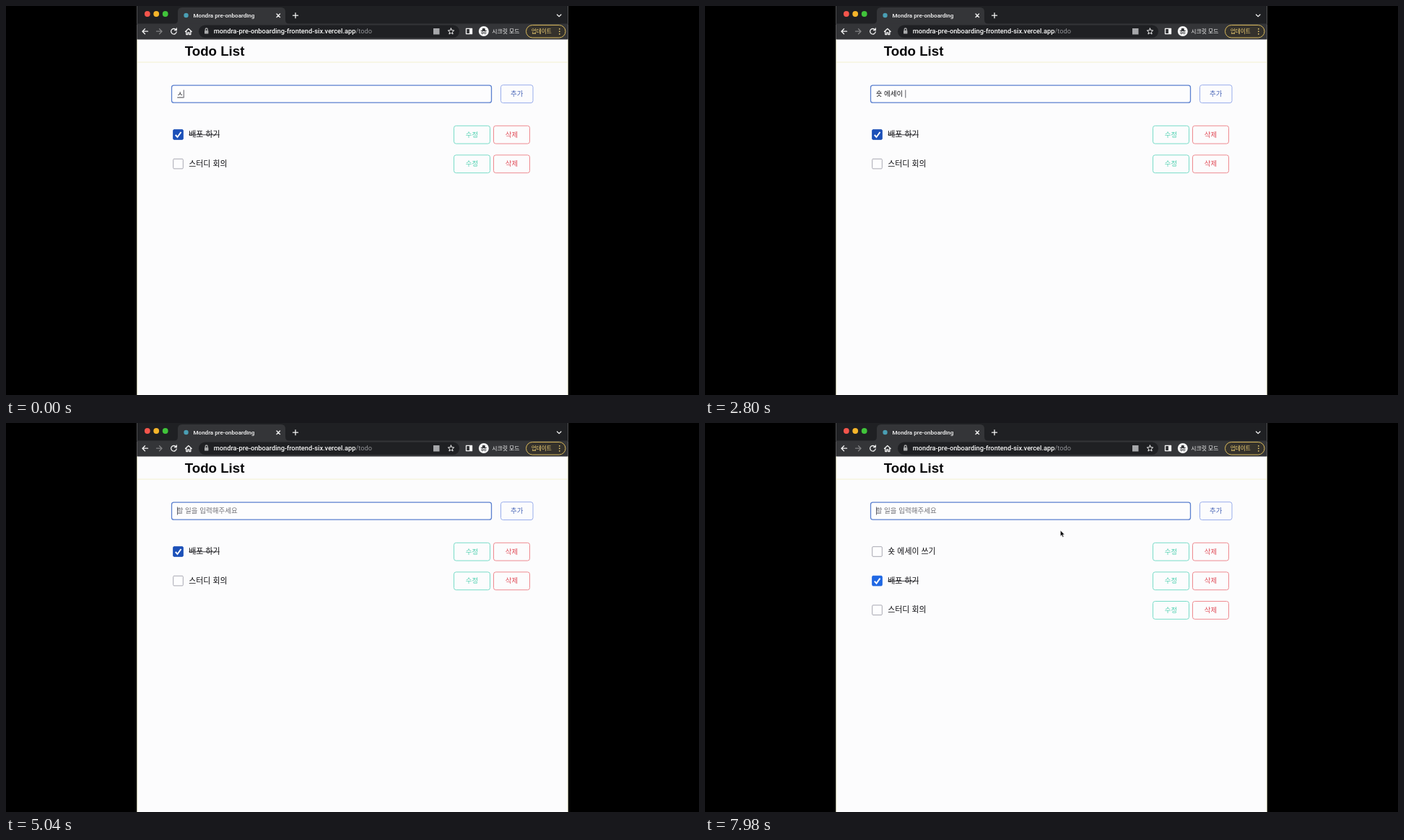
Animation of 960 by 540 pixels, one loop 8000 ms. Source, as an HTML page:

```html
<!DOCTYPE html>
<html lang="ko">
<head>
<meta charset="utf-8">
<title>Todo List</title>
<style>
  html, body { margin: 0; width: 100%; height: 100%; overflow: hidden; background: #000; }
  svg { display: block; width: 100%; height: 100%; }
  text { font-family: "Noto Sans CJK KR", "Noto Sans CJK", "Noto Sans CJK JP", sans-serif; white-space: pre; }
  .latin { font-family: Roboto, Inter, sans-serif; font-weight: 500; fill: #f8f8f8; }
  .title { font: bold 18.7px "Liberation Sans", Arial, sans-serif; fill: #060608; }
  .icon { fill: none; stroke: #f4f4f4; stroke-width: 1.3; stroke-linecap: round; stroke-linejoin: round; }
  .field { font-size: 9.5px; }
  .button { font-size: 9.4px; font-weight: 500; text-anchor: middle; }
  .label { font-size: 10.9px; fill: #101014; }
</style>
</head>
<body>
<svg viewBox="0 0 960 540">
  <rect width="960" height="540"/>
  <rect x="181.5" width="597" height="540" fill="#fcfcfd"/>

  <!-- Browser window -->
  <rect x="181.5" width="597" height="26" fill="#1f2023"/>
  <path d="M232 25Q238 25 238 19V8Q238 2 244 2H381Q387 2 387 8V19Q387 25 393 25Z" fill="#343538"/>
  <rect x="181.5" y="24.500" width="597" height="22" fill="#343538"/>
  <circle cx="195.800" cy="11" r="3.900" fill="#f4554c"/>
  <circle cx="208.200" cy="11" r="3.900" fill="#f5b52a"/>
  <circle cx="220.700" cy="11" r="3.900" fill="#40c43a"/>
  <circle cx="249.500" cy="13" r="3.200" fill="#4a9fb4"/>
  <text class="latin" x="259.500" y="16" font-size="8.050">Mondra pre-onboarding</text>
  <path class="icon" d="M375 11l4.500 4.500m0-4.500l-4.500 4.500M397.500 13.200h7m-3.500-3.500v7M763.500 12l2.700 2.600 2.700-2.600"/>

  <rect x="267" y="26.500" width="361" height="17.500" rx="8.750" fill="#1f2023"/>
  <path class="icon" d="M196.500 35.200h-7.500m3.500-3.500l-3.500 3.500 3.500 3.500"/>
  <path class="icon" opacity=".4" d="M208.500 35.200h7.500m-3.500-3.500l3.500 3.500-3.500 3.500"/>
  <path class="icon" d="M235.500 33a3.800 3.800 0 1 0 .7 3M236.300 31v2.700h-2.700M248.500 35.500l4.300-4 4.300 4m-7.300-1v5h2v-2.600h2v2.600h2v-5"/>
  <g opacity=".65">
    <rect x="275" y="34" width="5.400" height="4.600" rx=".7" fill="#f4f4f4"/>
    <path class="icon" stroke-width="1" d="M276.200 34v-1.500a1.500 1.500 0 0 1 3 0V34"/>
  </g>
  <text class="latin" x="287.700" y="38.200" font-size="9.250">mondra-pre-onboarding-frontend-six.vercel.app<tspan fill="#929397" font-weight="400">/todo</tspan></text>
  <rect x="592" y="31" width="8.500" height="8.500" fill="#a6a7aa"/>
  <path class="icon" style="stroke-width:1" d="M616.500 31l1.200 2.800 3 .2-2.300 2 .7 3-2.600-1.600-2.600 1.600.7-3-2.300-2 3-.2z"/>
  <path class="icon" d="M637.500 31.300h8v7.400h-8z"/>
  <path d="M642 31h4v8h-4z" fill="#f4f4f4"/>
  <circle cx="661.800" cy="35" r="7" fill="#f8f8f8"/>
  <path d="M659.500 34l.6-3h3.400l.6 3z" fill="#343538"/>
  <path d="M657.800 34.500h8" stroke="#343538"/>
  <g fill="none" stroke="#343538" stroke-width=".9">
    <circle cx="660" cy="37.300" r="1.300"/><circle cx="663.600" cy="37.300" r="1.300"/>
  </g>
  <text x="673.300" y="38" font-size="7.800" font-weight="500" fill="#f8f8f8">시크릿 모드</text>
  <rect x="720.500" y="26.500" width="54.500" height="17.500" rx="8.750" fill="#35322c" stroke="#d9b95c"/>
  <text x="727.700" y="38" font-size="7.600" font-weight="500" fill="#f4d476">업데이트</text>
  <path class="icon" style="stroke:#f4d476;stroke-width:1.7" d="M766.800 31.800v0m0 3.500v0m0 3.500v0"/>

  <!-- Page -->
  <path d="M182 46.500V540M778 46.500V540" stroke="#f5f4d8"/>
  <path d="M182 78h596" stroke="#f3f1d0"/>
  <text class="title" x="247.700" y="69">Todo List</text>
  <rect x="229.500" y="110.200" width="443" height="24" rx="3" fill="#fdfdfe" stroke="#5b80cf" stroke-width="1.300"/>
  <text id="entry" class="field" x="236.700" y="125"></text>
  <path id="underline" stroke="#2c2c30" stroke-width=".9"/>
  <path id="caret" stroke="#505058" stroke-width=".9"/>
  <rect x="685.500" y="109.700" width="44.500" height="24.800" rx="3" fill="none" stroke="#98acec"/>
  <text class="button" x="707.700" y="125" fill="#4a66b8">추가</text>
  <g id="list"></g>
  <path id="pointer" d="M0 0v8.200l1.900-1.700 1.300 2.900 1.500-.7-1.300-2.800h2.500z" fill="#08080a" stroke="#fcfcfd" stroke-width=".6"/>
</svg>
<script>
const LOOP = 8000, SUBMIT = 5040, ADDED = 5100;
const FIELD_X = 236.7, ROW_Y = 178.5, ROW_STEP = 40.6;
const PLACEHOLDER = "할 일을 입력해주세요";
const MOVE = { start: 7840, end: 7980, from: [696, 176], to: [492.3, 149] };

// Input contents as Hangul syllables are composed
const typing = [
  [0, "ㅅ"], [200, "쇼"], [420, "숏"], [1400, "숏 "], [1560, "숏 ㅇ"], [1720, "숏 에"],
  [2100, "숏 엣"], [2240, "숏 에세"], [2400, "숏 에셍"], [2520, "숏 에세이"], [2700, "숏 에세이 "],
  [3760, "숏 에세이 ㅆ"], [3920, "숏 에세이 쓰"], [4040, "숏 에세이 쓱"], [4160, "숏 에세이 쓰기"],
  [SUBMIT, ""]
];
const blinking = [
  [0, true], [1120, false], [1400, true], [2920, false], [3760, true], [4620, false],
  [SUBMIT, true], [5500, false], [6200, true], [7000, false], [7840, true]
];
const todos = [
  { text: "배포 하기", done: true },
  { text: "스터디 회의" }
];
const added = { text: "숏 에세이 쓰기" };

const [entry, underline, caret, list, pointer] =
  ["entry", "underline", "caret", "list", "pointer"].map(id => document.getElementById(id));

const valueAt = (steps, t) => steps.findLast(([start]) => start <= t)[1];

const button = (x, label, border, color) => `
  <rect x="${x}" y="-12.2" width="50" height="24.8" rx="3" fill="none" stroke="${border}"/>
  <text class="button" x="${x + 25}" y="3" fill="${color}">${label}</text>`;

function row({ text, done }, index, blue) {
  return `<g transform="translate(0 ${ROW_Y + index * ROW_STEP})">
    <rect x="231.700" y="-6.800" width="13.600" height="13.600" rx="1.200"
      fill="${done ? blue : "#fdfdfe"}" stroke="${done ? blue : "#a8a8b2"}"/>
    ${done ? '<path d="M234.800 .5l2.700 3 5-7" fill="none" stroke="#fdfdfe" stroke-width="2"/>' : ""}
    <text class="label" x="253.300" y="3.500">${text}</text>
    ${done ? '<path d="M253.300 .3h42.500" stroke="#28282c" stroke-width=".9"/>' : ""}
    ${button(620.5, "수정", "#78dcc8", "#4fd0b0")}
    ${button(675.5, "삭제", "#ee8a90", "#e14c58")}
  </g>`;
}

let shownList;
function drawList(isAdded) {
  if (shownList === isAdded) return;
  shownList = isAdded;
  const items = isAdded ? [added, ...todos] : todos;
  const blue = isAdded ? "#2068e4" : "#1c50b8";
  list.innerHTML = items.map((item, i) => row(item, i, blue)).join("");
}

function drawEntry(t) {
  const text = valueAt(typing, t);
  entry.textContent = text || PLACEHOLDER;
  entry.setAttribute("fill", text ? "#18181c" : "#707076");
  const width = text ? entry.getComputedTextLength() : 0;
  const end = FIELD_X + width + 0.8;
  caret.setAttribute("d", `M${end} 116.500v11`);
  caret.style.visibility = valueAt(blinking, t) ? "visible" : "hidden";

  const composing = text && !text.endsWith(" ");
  underline.setAttribute("d", composing ? `M${end - 9} 127h8.500` : "");
}

function drawPointer(t) {
  const p = Math.min(1, Math.max(0, (t - MOVE.start) / (MOVE.end - MOVE.start)));
  const eased = 1 - (1 - p) ** 2;
  const [x, y] = MOVE.from.map((a, i) => a + (MOVE.to[i] - a) * eased);
  pointer.setAttribute("transform", `translate(${x} ${y})`);
  pointer.style.visibility = t >= MOVE.start ? "visible" : "hidden";
}

function draw() {
  const t = performance.now() % LOOP;
  drawEntry(t);
  drawList(t >= ADDED);
  drawPointer(t);
  requestAnimationFrame(draw);
}
draw();
</script>
</body>
</html>
```
